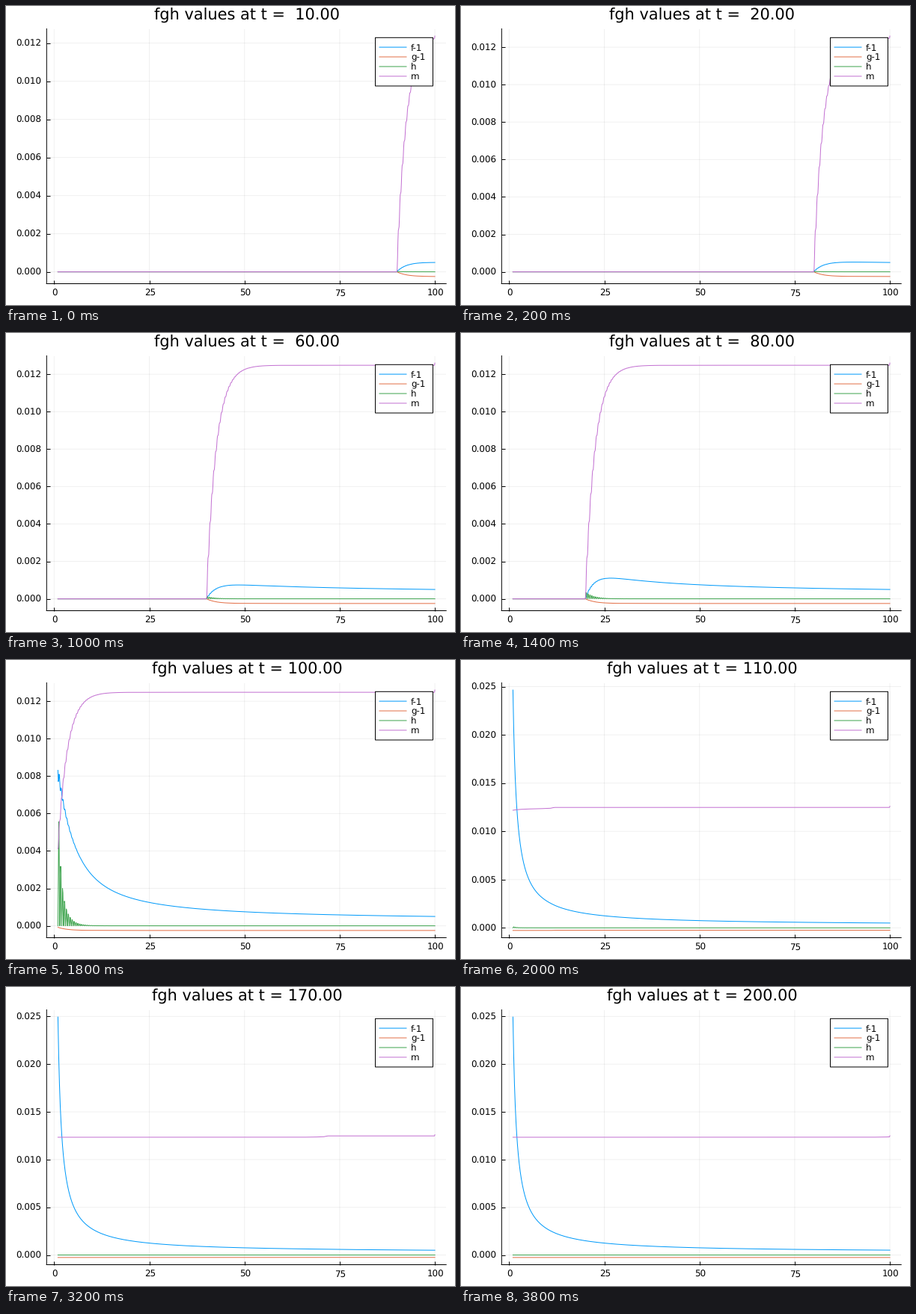
These frames come from a looping animation (600x400 px, 4000 ms). A matplotlib script:

```python
import numpy as np
import matplotlib.pyplot as plt
from matplotlib.animation import FuncAnimation
from matplotlib.lines import Line2D
from matplotlib.patches import Rectangle
from matplotlib.transforms import ScaledTranslation

W, H, DPI = 600, 400, 100
PX = 72 / DPI                      # one pixel in points
FRAMES, INTERVAL = 20, 200
NAMES = ["f-1", "g-1", "h", "m"]
COLORS = ["#009afa", "#e36f47", "#3ea44e", "#c371d2"]
MASS, TAU = 0.01248, 2.5           # final mass and pulse decay length

plt.rcParams.update({
    "font.family": "DejaVu Sans",
    "text.hinting": "none",
    "path.snap": False,
})

x = np.linspace(1, 100, 991)


def fields(t):
    """Pulse running inwards from x = 100, then its weak reflection."""
    d = np.maximum(x - (100 - t), 0)
    u = d - np.sin(4 * np.pi * d) / (4 * np.pi)
    decay = np.exp(-u / TAU)
    slope = MASS / TAU * decay * 2 * np.sin(2 * np.pi * d) ** 2
    m = MASS * (1 - decay)
    h = 1.2 * slope * np.exp(-x / 50) / x
    g = -0.02 * m
    if t > 100:
        s = t - 98.6 - x
        behind = np.clip(s + 0.5, 0, 1)
        s = np.maximum(s, 0)
        m = m - behind * (0.00014 - 0.00007 * np.exp(-s / TAU))
        g = g - behind * (0.00001 + 0.00003 * np.exp((100 - t) / 12))
    f = 2 * m / x - g
    m[-1] += 0.00012
    return f, g, h, m


fig = plt.figure(figsize=(W / DPI, H / DPI), dpi=DPI, facecolor="white")
left, right, top, bottom = 54.3, 588.2, 30.5, 371.5
ax = fig.add_axes([left / W, 1 - bottom / H, (right - left) / W, (bottom - top) / H])
ax.set_xlim(-1.97, 102.97)
ax.set_xticks(range(0, 101, 25))
ax.set_axisbelow(True)
ax.grid(color="black", alpha=0.06, lw=PX)
ax.spines[["top", "right"]].set_visible(False)
ax.spines[["left", "bottom"]].set_linewidth(PX)
ax.tick_params(direction="in", length=5 * PX, width=PX, labelsize=11.9 * PX)
ax.tick_params(axis="y", pad=6.7 * PX)
ax.tick_params(axis="x", pad=7.4 * PX)
ax.yaxis.set_major_formatter("{x:.3f}")
nudge = ScaledTranslation(0.7 / DPI, 0, fig.dpi_scale_trans)
for tick_label in ax.get_xticklabels():
    tick_label.set_transform(tick_label.get_transform() + nudge)

curves = [ax.plot([], [], color=c, lw=PX)[0] for c in COLORS]


def label(px, py, s, size, **kw):
    return fig.text(px / W, 1 - py / H, s, fontsize=size * PX, va="baseline", **kw)


def add_legend():
    fig.add_artist(Rectangle((493.5 / W, 1 - 107 / H), 77 / W, 64.7 / H,
                             fc="white", ec="black", lw=PX, zorder=5))
    for i, (name, color) in enumerate(zip(NAMES, COLORS)):
        y = 55.1 + 12.95 * i
        fig.add_artist(Line2D([499 / W, 535 / W], [1 - y / H] * 2,
                              color=color, lw=PX, zorder=6))
        label(541, y + 4.4, name, 11.9, zorder=6)


add_legend()
title = label(322.1, 18.4, "", 20.83, ha="center")


def update(k):
    t = 10 * (k + 1)
    data = fields(t)
    for curve, y in zip(curves, data):
        curve.set_data(x, y)
    lo, hi = np.min(data), np.max(data)
    pad = 0.03 * (hi - lo)
    step = 0.002 if hi < 0.02 else 0.005
    ax.set_yticks(np.arange(0, hi + pad, step))
    ax.set_ylim(lo - pad, hi + pad)
    title.set_text(f"fgh values at t = {t:6.2f}")
    return [*curves, title]


anim = FuncAnimation(fig, update, frames=FRAMES, interval=INTERVAL,
                     repeat=True, repeat_delay=0, blit=False)
plt.show()
```
